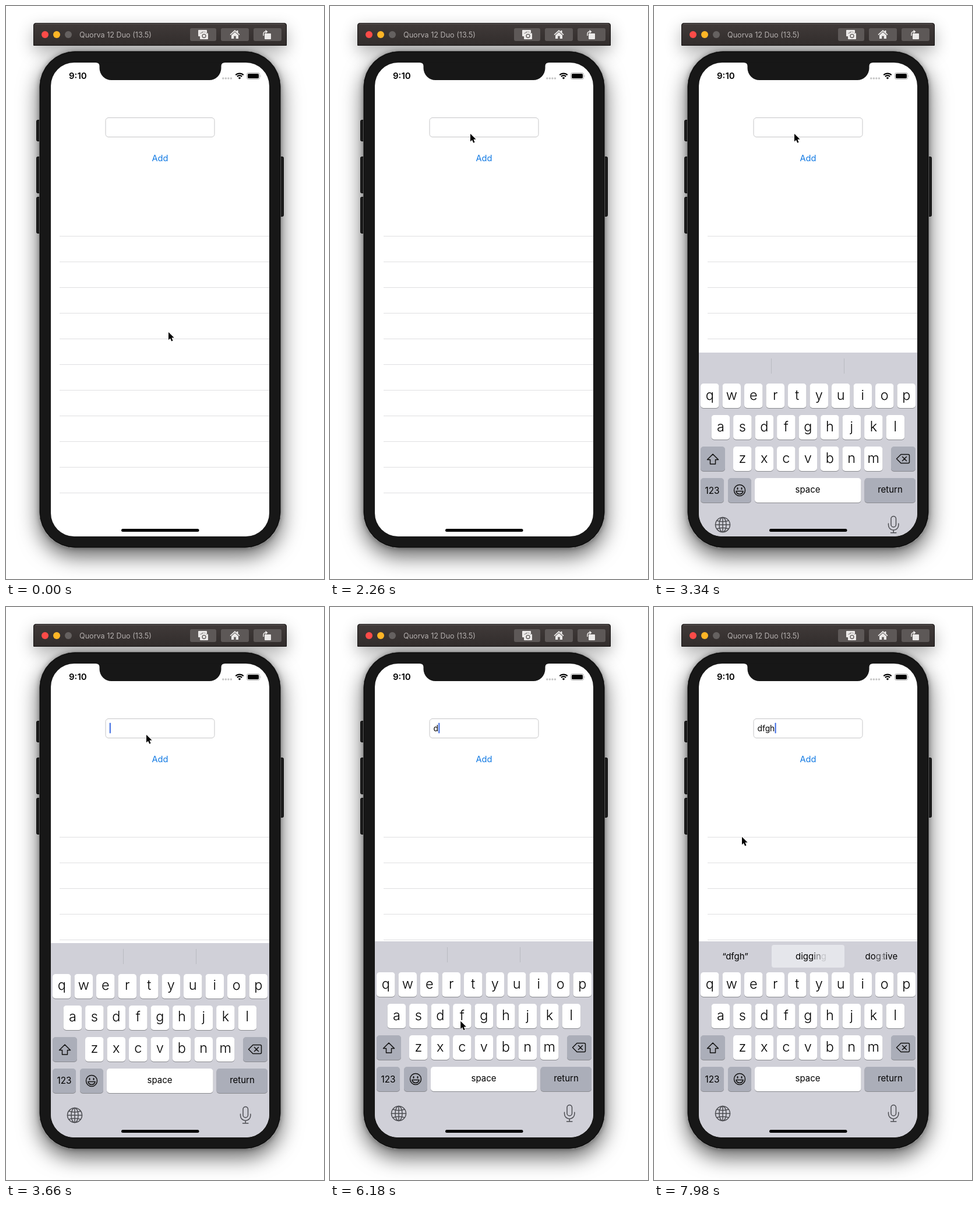
Animation, 546 px wide and 982 px high, one loop 8 s. Source, as an HTML page:

```html
<!DOCTYPE html>
<html lang="en">
<head>
<meta charset="utf-8">
<title>Phone simulator</title>
<style>
html, body { margin: 0; width: 100%; height: 100%; overflow: hidden; background: #fff; }
div, svg { position: absolute; }
svg { left: 0; top: 0; font-family: Inter, Roboto, sans-serif; }
.bar { left: 47px; top: 29px; width: 435px; height: 39px; border-radius: 4px 4px 0 0; box-shadow: 0 10px 28px rgba(0,0,0,.3); }
.body { left: 57px; top: 77px; width: 415px; height: 852px; border-radius: 62px; box-shadow: 0 14px 36px rgba(0,0,0,.62), 0 0 8px rgba(0,0,0,.3); }
.line { fill: none; stroke: #4c4d52; stroke-width: 1.5; stroke-linecap: round; stroke-linejoin: round; }
.mid { text-anchor: middle; }
</style>
</head>
<body>
<div class="bar"></div>
<div class="body"></div>
<svg width="546" height="982" viewBox="0 0 546 982">
  <defs>
    <clipPath id="screen"><rect x="77" y="97" width="375" height="812" rx="40"/></clipPath>
    <linearGradient id="metal" x2="0" y2="1"><stop stop-color="#403a39"/><stop offset="1" stop-color="#322d2c"/></linearGradient>
    <filter id="soft" x="-30%" y="-30%" width="160%" height="160%"><feDropShadow dx="0" dy="1" stdDeviation="2" flood-opacity=".3"/></filter>
  </defs>

  <!-- title bar -->
  <path d="M47.5 67.5V33a3.5 3.5 0 0 1 3.5-3.5H478a3.5 3.5 0 0 1 3.5 3.5V67.5Z" fill="url(#metal)" stroke="#121010"/>
  <path d="M51 30.5H478" stroke="#625c5b"/>
  <circle cx="67" cy="49" r="6" fill="#fc4b48"/>
  <circle cx="87" cy="49" r="6" fill="#fdb526"/>
  <circle cx="107" cy="49" r="6" fill="#656160"/>
  <text x="126" y="53.6" font-size="12.6" fill="#b5b0af">Quorva 12 Duo (13.5)</text>
  <g fill="#5d5857">
    <rect x="316" y="38" width="45" height="22" rx="3"/>
    <rect x="369" y="38" width="48" height="22" rx="3"/>
    <rect x="425" y="38" width="48" height="22" rx="3"/>
  </g>
  <g fill="#eceae9">
    <path d="M331 41h13a1 1 0 0 1 1 1v4h-2l-1-2h-5l-1.500 2H333v6h-2a1 1 0 0 1-1-1v-9a1 1 0 0 1 1-1Z"/>
    <path d="M334 46.500h2.500l1.300-2h4.400l1.300 2H346a1 1 0 0 1 1 1V56a1 1 0 0 1-1 1H334a1 1 0 0 1-1-1v-8.500a1 1 0 0 1 1-1Z"/>
    <circle cx="340" cy="51.300" r="3" fill="none" stroke="#5d5857" stroke-width="1.300"/>
    <path d="M393 41l3 2.700V42h2.500v4l3 2.800-1 1.200L393 43.500l-7.500 6.500-1-1.200Z"/>
    <path d="M387 50l6-5.200 6 5.200v6h-4.300v-4.500h-3.400V56H387Z"/>
    <rect x="444" y="47" width="11" height="10" rx="1"/>
    <path d="M442 51v-3q0-4 4-4" fill="none" stroke="#eceae9" stroke-width="1.500"/>
    <path d="M445.500 40.800l4 3.200-4 3.200Z"/>
  </g>

  <!-- phone -->
  <g fill="#1c1c1c" stroke="#090909">
    <rect x="52.500" y="195.500" width="9" height="36" rx="2"/>
    <rect x="52.500" y="258.500" width="9" height="62" rx="2"/>
    <rect x="52.500" y="327.500" width="9" height="62" rx="2"/>
    <rect x="467.500" y="258.500" width="9" height="102" rx="2"/>
  </g>
  <rect x="57.500" y="77.500" width="414" height="851" rx="61.500" fill="#171717" stroke="#545454"/>
  <rect x="58.500" y="78.500" width="412" height="849" rx="60.500" fill="none" stroke="#080808"/>
  <rect x="77" y="97" width="375" height="812" rx="40" fill="#fff"/>

  <g clip-path="url(#screen)">
    <path id="rules" stroke="#dfdfe1"/>
    <rect x="171" y="191.500" width="187" height="33" rx="5" fill="#fff" stroke="#c5c5c7"/>
    <text id="typed" x="177.500" y="213" font-size="13.800"></text>
    <rect id="caret" y="198.500" width="2" height="18" rx=".8" fill="#3867e0"/>
    <text class="mid" x="264.500" y="266.300" font-size="14.600" fill="#0f78e3">Add</text>
    <g id="keyboard"></g>
    <rect x="198" y="896" width="133.500" height="5" rx="2.500"/>
  </g>

  <!-- notch and status -->
  <path d="M154 96.500h222v.500q-6.500 0-6.500 6v3.500a20.500 20.500 0 0 1-20.500 20.500H181a20.500 20.500 0 0 1-20.500-20.500V103q0-6-6.500-6Z" fill="#171717"/>
  <text x="108" y="125.300" font-size="15" font-weight="600">9:10</text>
  <path d="M372.800 124h14" stroke="#c4c4c4" stroke-width="3.400" stroke-linecap="round" stroke-dasharray="0 4.550"/>
  <path d="M394.300 118.300A9.500 9.500 0 0 1 407.700 118.300M396.900 120.900A5.800 5.800 0 0 1 405.100 120.900" fill="none" stroke="#000" stroke-width="2.300"/>
  <path d="M401 125.500l-2.300-2.300a3.200 3.200 0 0 1 4.600 0Z"/>
  <rect x="413.500" y="114.500" width="22" height="11" rx="3" fill="none" stroke="#a5a5a5"/>
  <rect x="415" y="116" width="19" height="8" rx="1.700"/>
  <path d="M436.800 118.300q1.600 1.700 0 3.500Z" fill="#a5a5a5"/>

  <path id="cursor" d="M0 0V13.200L3 10.400 5.200 15.400 7.500 14.400 5.400 9.600H9.600Z" stroke="#fff" stroke-width="1.600" stroke-linejoin="round" paint-order="stroke"/>
</svg>
<script>
const LOOP = 8000;
const $ = id => document.getElementById(id);
const clamp = v => Math.max(0, Math.min(1, v));
const ramp = (t, from, length) => clamp((t - from) / length);

$('rules').setAttribute('d', Array.from({ length: 11 }, (_, i) => `M92 ${394.5 + 44 * i}H452`).join(''));

// Keyboard, drawn in its resting place
const keyCentre = {};
const label = (x, y, size, text, weight = 400) =>
  `<text class="mid" x="${x}" y="${y}" font-size="${size}" font-weight="${weight}">${text}</text>`;
const key = (x, y, width, fill = '#fff') =>
  `<rect x="${x}" y="${y + 1}" width="${width}" height="42" rx="5" fill="#898a8f"/>
   <rect x="${x}" y="${y}" width="${width}" height="42" rx="5" fill="${fill}"/>`;
const letterRow = (letters, left, y) => [...letters].map((letter, i) => {
  const x = left + 37.5 * i;
  keyCentre[letter] = x + 15.75;
  return key(x, y, 31.5) + label(x + 15.75, y + 27.5, 23.5, letter, 300);
}).join('');
const GREY = '#abaeb9';

// Each word: text, x, anchor, then times at which its letters start to appear and to vanish
const words = [
  ['“df”', 139, 'middle', 6640, 7300, 0],
  ['“dfg”', 139, 'middle', 7300, 7680, 0],
  ['“dfgh”', 139.5, 'middle', 7680, 9e3, 0],
  ['Ed', 254.5, 'start', 6980, 7700, 70],
  ['digging', 243, 'start', 7690, 9e3, 45],
  ['effective', 356.5, 'start', 6690, 7700, 48],
  ['dogs', 362.5, 'start', 7760, 9e3, 65]
];

$('keyboard').innerHTML = `
  <rect x="77" y="573" width="375" height="340" fill="#d0d0d8"/>
  <path id="dividers" d="M201.5 583v26M326.500 583v26" stroke="#b9bac1"/>
  <rect id="highlight" x="202" y="579" width="125" height="39" rx="4" fill="#e5e6eb"/>
  ${words.map(([text, x, anchor]) => `<text class="word" x="${x}" y="604" font-size="15" text-anchor="${anchor}">${
    [...text].map(c => `<tspan>${c}</tspan>`).join('')}</text>`).join('')}
  ${letterRow('qwertyuiop', 80, 626)}
  ${letterRow('asdfghjkl', 98.6, 680)}
  ${letterRow('zxcvbnm', 136, 734)}
  ${key(80, 734, 42, GREY)}${key(407, 734, 42, GREY)}
  ${key(80, 788, 40, GREY)}${key(127, 788, 40, GREY)}
  ${key(173, 788, 182.5)}${key(361.5, 788, 87.5, GREY)}
  ${label(100, 814.5, 15.3, '123')}${label(264, 813.3, 15, 'space')}${label(405.5, 813.3, 15, 'return')}
  <g class="line" style="stroke:#111">
    <path d="M101 747l9.500 9.500h-5v7.500h-9v-7.500h-5Z"/>
    <path d="M424 747.500h12.500a2 2 0 0 1 2 2v11a2 2 0 0 1-2 2H424l-7.500-7.500ZM426.500 751.500l7 7M433.500 751.500l-7 7"/>
    <circle cx="147" cy="809" r="9.500"/>
    <path d="M143.500 805v2M150.500 805v2" stroke-width="2"/>
    <path d="M141 810.500h12q-1 5-6 5t-6-5Z"/>
  </g>
  <g class="line">
    <circle cx="118" cy="868" r="12.500"/><ellipse cx="118" cy="868" rx="6" ry="12.500"/>
    <path d="M118 855.500v25M105.500 868h25M108 861q10 3.500 20 0M108 875q10-3.500 20 0"/>
    <rect x="407" y="853.500" width="8.500" height="18.500" rx="4.250"/>
    <path d="M402.500 866v2.500a8.700 8.700 0 0 0 17.400 0V866M411.200 877.500v4.200M406.500 881.700h9.400"/>
  </g>
  <g id="popup">
    <path d="M-19-65H19a10 10 0 0 1 10 10v29c0 12-13.300 14-13.300 27V37a5 5 0 0 1-5 5h-21.400a5 5 0 0 1-5-5V1c0-13-13.300-15-13.300-27V-55a10 10 0 0 1 10-10Z" fill="#fff" filter="url(#soft)"/>
    <text id="popupLetter" class="mid" y="-24" font-size="35" font-weight="300"></text>
  </g>`;

const wordLetters = [...document.querySelectorAll('.word')].map(word => [...word.children]);

// Letter, key down, letter typed, key up
const presses = [['d', 5640, 5740, 5800], ['f', 6300, 6400, 6460], ['g', 6990, 7090, 7160], ['h', 7340, 7440, 7500]];

// Time, x, y
const pointerPath = [
  [0, 279, 559], [300, 262, 331], [560, 262, 331], [820, 145, 285], [1100, 242, 222], [1380, 242, 222],
  [1520, 242, 220], [1660, 241, 219], [3860, 241, 219], [4960, 213, 656], [5180, 213, 656], [5600, 191, 708],
  [5860, 191, 708], [6260, 228, 710], [6560, 228, 710], [6940, 268, 716], [7120, 280, 724], [7320, 302, 708],
  [7540, 302, 708], [7960, 151, 394], [LOOP, 151, 394]
];
function pointerAt(t) {
  const i = pointerPath.findIndex(p => p[0] > t);
  const [t0, x0, y0] = pointerPath[i - 1], [t1, x1, y1] = pointerPath[i];
  const u = (t - t0) / (t1 - t0), e = u * u * (3 - 2 * u);
  return [x0 + (x1 - x0) * e, y0 + (y1 - y0) * e];
}

function caretOpacity(t) {
  if (t < 2500) return 0;
  if (t < 3050 || t > 5740) return 1;
  const phase = t % 1000;
  return 1 - ramp(phase, 80, 60) + ramp(phase, 420, 80);
}

function draw(t) {
  $('cursor').setAttribute('transform', `translate(${pointerAt(t)})`);

  // Critically damped spring
  const s = Math.max(0, t - 2720) * 0.0072;
  $('keyboard').setAttribute('transform', `translate(0 ${336 * (1 + s) * Math.exp(-s)})`);

  $('typed').textContent = presses.filter(p => t >= p[2]).map(p => p[0]).join('');
  $('caret').setAttribute('x', 177.8 + $('typed').getComputedTextLength());
  $('caret').setAttribute('opacity', caretOpacity(t));

  const pressed = presses.find(p => t >= p[1] && t < p[3]);
  $('popup').setAttribute('visibility', pressed ? 'visible' : 'hidden');
  if (pressed) {
    $('popup').setAttribute('transform', `translate(${keyCentre[pressed[0]]} 680)`);
    $('popupLetter').textContent = pressed[0];
  }

  const suggesting = ramp(t, 6640, 60);
  $('highlight').setAttribute('opacity', suggesting);
  $('dividers').setAttribute('opacity', 1 - suggesting);
  words.forEach(([, , , start, end, stagger], w) => wordLetters[w].forEach((letter, i) => {
    const shown = ramp(t, start + i * stagger, stagger ? 150 : 80);
    const gone = ramp(t, end + i * stagger, 80);
    letter.setAttribute('fill-opacity', shown * (1 - gone));
  }));
}

function tick() {
  draw(performance.now() % LOOP);
  requestAnimationFrame(tick);
}
tick();
</script>
</body>
</html>
```
